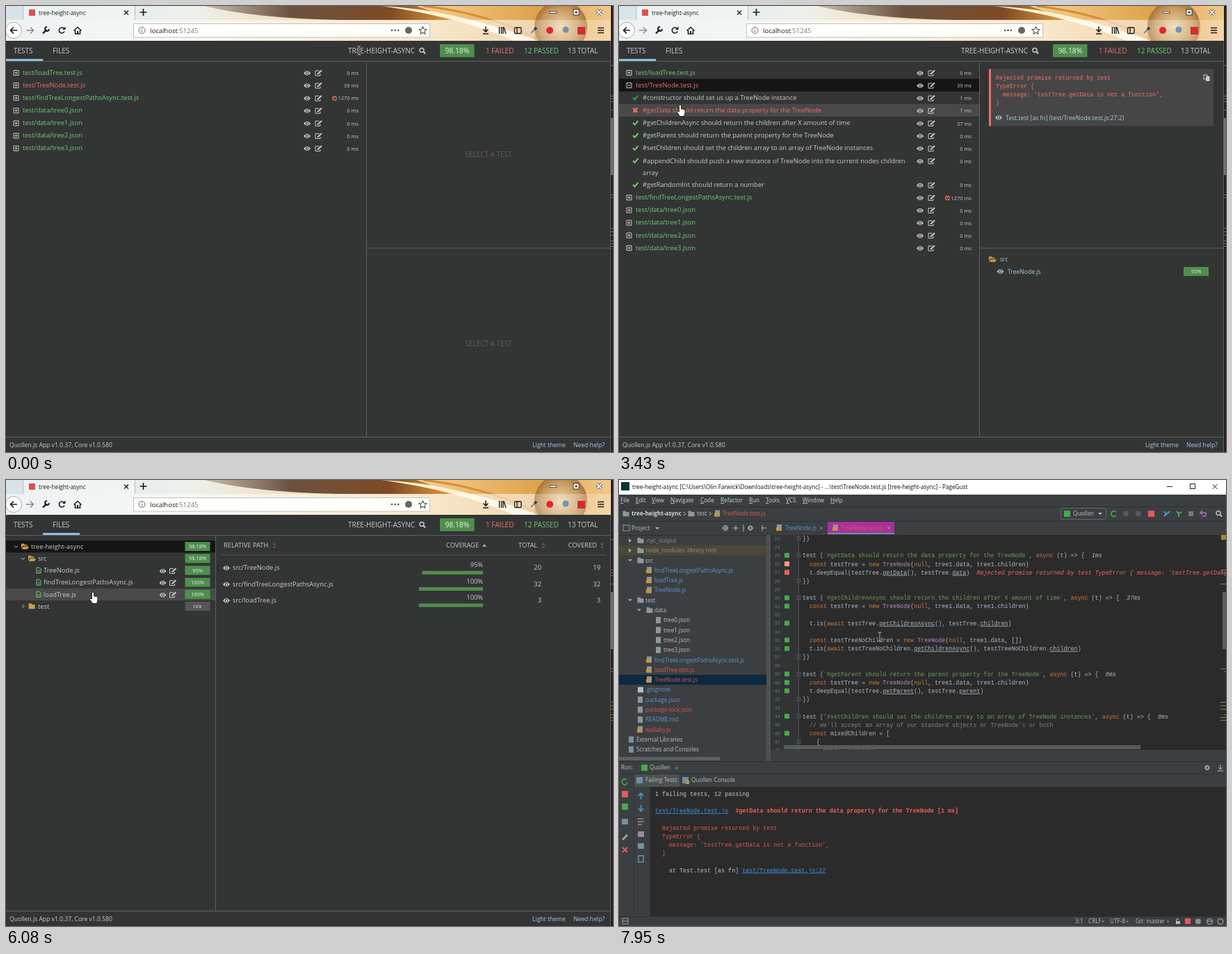
Animation, 873 px wide and 641 px high, one loop 8000 ms. Source, as an HTML page:

```html
<!DOCTYPE html>
<html lang="en">
<head>
<meta charset="utf-8">
<title>Test runner</title>
<style>
html, body { margin: 0; width: 100%; height: 100%; overflow: hidden; background: #333534; }
svg { display: block; width: 873px; height: 641px; font-family: "Open Sans", "Noto Sans", sans-serif; }
text { white-space: pre; }
.mono { font-family: "Liberation Mono", monospace; }
.u { text-decoration: underline; }
</style>
</head>
<body>
<svg id="stage" viewBox="0 0 873 641"></svg>
<script>
const BG = '#333534', LIGHT = '#c9cbca', GREEN = '#74c874', RED = '#ee7066', BLUE = '#a3cbe3',
      BADGE = '#4f8f4c', LINE = '#5a605e', FOLDER = '#c9a040';

// Drawing helpers; the y of a text is its visual centre
const rect = (x, y, w, h, fill, more = '') => `<rect x="${x}" y="${y}" width="${w}" height="${h}" fill="${fill}" ${more}/>`;
const circle = (x, y, r, fill, more = '') => `<circle cx="${x}" cy="${y}" r="${r}" fill="${fill}" ${more}/>`;
const line = (d, color, w = 1, fill = 'none') => `<path d="${d}" stroke="${color}" stroke-width="${w}" fill="${fill}"/>`;
const shape = (d, fill) => `<path d="${d}" fill="${fill}"/>`;
const text = (x, y, s, fill = LIGHT, size = 9.33, more = '') =>
  `<text x="${x}" y="${y + size * .36}" fill="${fill}" font-size="${size}" ${more}>${s}</text>`;
const END = 'text-anchor="end"', MID = 'text-anchor="middle"', MONO = 'class="mono"', BOLD = 'font-weight="bold"';
const mono = (x, y, s, fill, more = '') => text(x, y, s, fill, 8.35, MONO + ' ' + more);
const group = (id, body) => `<g id="${id}">${body}</g>`;
const at = (x, y, body) => `<g transform="translate(${x} ${y})">${body}</g>`;

// Icons
const eye = (x, y, c = LIGHT) => at(x, y, shape('M-5 0Q0-6.5 5 0Q0 6.5-5 0Z', c) + circle(0, 0, 2.3, BG) + circle(0, 0, 1.3, c));
const edit = (x, y) => at(x, y, line('M2.5 1V3.5H-4.5V-3.5H1', LIGHT) + line('M-1.5 1.5L4.5-4', LIGHT, 2));
const expander = (x, y, open) => line(`M${x - 3.5} ${y - 3.5}h7v7h-7zM${x - 2} ${y}h4` + (open ? '' : `M${x} ${y - 2}v4`), LIGHT);
const check = (x, y, o) => `<g opacity="${o}">${line(`M${x - 3.5} ${y}l2.7 2.7L${x + 4} ${y - 3}`, GREEN, 2)}</g>`;
const cross = (x, y, r, c, w = 1) => line(`M${x - r} ${y - r}l${2 * r} ${2 * r}m0 ${-2 * r}l${-2 * r} ${2 * r}`, c, w);
const folder = (x, y, c = FOLDER) => shape(`M${x - 4.5} ${y - 4}h4l1 1.4h4v6.4h-9z`, c);
const openFolder = (x, y, c = FOLDER) => shape(`M${x - 5} ${y - 4}h4l1 1.4h3.5v1.6h-6l-2.5 4z`, c) + shape(`M${x - 2} ${y}h8l-2 4h-8.5z`, c);
const doc = (x, y) => line(`M${x - 3} ${y - 4}h4l2 2v6h-6z`, GREEN) + line(`M${x - 1.5} ${y}h3m-3 2h3`, GREEN, .8);
const chevron = (x, y, down) => line(down ? `M${x - 2.5} ${y - 1}l2.5 2.5l2.5-2.5` : `M${x - 1} ${y - 2.5}l2.5 2.5l-2.5 2.5`, LIGHT);
const caret = (x, y, c, down = true, r = 3) => shape(`M${x - r} ${y}h${2 * r}l${-r} ${down ? r : -r}z`, c);
const badge = (x, y, s, c = BADGE) => rect(x, y - 6.5, 36, 13, c) + text(x + 18, y, s, '#e8ece8', 7.47, MID);
const search = (x, y, c) => circle(x - 1, y - 1, 3, 'none', `stroke="${c}" stroke-width="1.5"`) + line(`M${x + 1} ${y + 1}l3 3`, c, 2);
const gear = (x, y, c) => circle(x, y, 2.5, 'none', `stroke="${c}" stroke-width="2.4" stroke-dasharray="1.5 .6"`);

function edgeMarks() {
  const marks = [85, 129, 133, 137, 149, 271, 275, 319, 324, 329, 337, 341, 345];
  return rect(870, 161, 3, 82, '#77706f') + marks.map(y => rect(870, y, 3, 1, '#8a6a3c')).join('');
}

function browser() {
  const ink = '#1d1d1d';
  const stops = [[0, '#d5e4e8'], [.3, '#edf1ec'], [.48, '#f0dfbd'], [.7, '#f2cc8c'], [.88, '#dfa24b'], [1, '#efc98c']];
  const theme = `<defs><linearGradient id="sky">${stops.map(([o, c]) => `<stop offset="${o}" stop-color="${c}"/>`).join('')}</linearGradient>
    <linearGradient id="swoosh"><stop stop-color="#c9bfae"/><stop offset=".35" stop-color="#6b5140"/><stop offset=".75" stop-color="#7e4a26"/><stop offset="1" stop-color="#e09a3a"/></linearGradient>
    <radialGradient id="globe"><stop stop-color="#ead3ac"/><stop offset=".7" stop-color="#c99a5e"/><stop offset="1" stop-color="#a8743c"/></radialGradient></defs>`;
  const windowButtons = rect(782, 8, 10, 2.5, '#fff', 'stroke="#333" stroke-width=".8"') +
    rect(816, 5, 8, 8, '#fff', 'stroke="#333"') + rect(818.5, 7.5, 3, 3, '#444') + cross(853, 9, 3.5, '#444', 3.5) + cross(853, 9, 3.5, '#fff', 1.8);
  const toolbar = circle(11, 35, 11.5, '#fff', 'stroke="#aaa"') + line('M16 35H6.5M11 30.5L6.5 35L11 39.5', ink, 1.7) +
    line('M29 35h10M35 30.5l4.5 4.5l-4.5 4.5', '#8d8d8d', 1.5) +
    line('M53 39.5l5.5-5.5', ink, 2.4) + line('M62 33a3 3 0 1 1-3-3', ink, 1.8) +
    line('M83.5 32.5a4 4 0 1 0 .5 4', ink, 1.6) + shape('M85.5 29.5v4.5h-4.5z', ink) +
    line('M97.5 35.5l5.5-5l5.5 5M99.5 35v5h7v-5', ink, 1.6) + rect(102, 36, 2, 4, ink) +
    rect(183.5, 25.5, 426, 19.5, '#fffffb', 'stroke="#c5c1b8"') + circle(195.5, 35, 4.5, 'none', 'stroke="#666"') +
    line('M195.5 34.5v3M195.5 32v1.2', '#666') +
    text(207, 35.5, `localhost<tspan fill="#777">:51245</tspan>`, ink, 9.5) +
    [555, 559.5, 564].map(x => circle(x, 35, 1.3, '#555')).join('') + circle(579, 35, 5, '#666') +
    line('M599.5 29.8l1.6 3.5l3.8.4l-2.8 2.6l.8 3.8l-3.4-1.9l-3.4 1.9l.8-3.8l-2.8-2.6l3.8-.4z', '#555', 1.1) +
    line('M690 29.5v7M686.5 33.5l3.5 3.5l3.5-3.5M686 40h8', ink, 1.6) +
    line('M709.5 30v10M712.5 30v10M715 30v10M716 30.5l3 9.5', ink, 1.4) +
    rect(731.5, 31, 9.5, 8.5, 'none', 'stroke="#1d1d1d" stroke-width="1.3" rx="1"') + line('M735 31v9', ink, 1.3) +
    line('M755 39l5-5', '#5890b0', 2) + line('M760 34l3-3', '#36404a', 3.6) +
    circle(782, 35, 5, '#e5252d') + circle(805, 34, 4.5, '#7794a8') + rect(822, 30, 11, 11, '#d32d2f') +
    line('M851 31.5h9M851 35h9M851 38.5h9', ink, 1.7);
  return theme + rect(0, 0, 870, 50, 'url(#sky)') +
    shape('M285 0H590Q615 8 640 20H480Q360 18 285 0Z', 'url(#swoosh)') +
    shape('M540 0Q640 4 765 50H730Q650 15 540 0Z', '#fff2d2') + line('M600 0Q690 10 760 45', '#d78e33', 3) +
    `<clipPath id="bar">${rect(0, 0, 870, 50)}</clipPath><g clip-path="url(#bar)">${circle(798, 30, 38, 'url(#globe)')}</g>` +
    rect(0, 20, 760, 30, '#fff', 'opacity=".55"') + rect(760, 20, 110, 30, '#fff', 'opacity=".25"') +
    rect(25, 0, 160, 20, '#f4f7f6', 'opacity=".75"') + line('M25 0V20M185.5 0V20', '#b7c1c3') +
    rect(33, 5, 9, 9, '#e04f4f') + text(47, 9.5, 'tree-height-async', ink, 8.4) + cross(173, 9.5, 3, ink, 1.4) +
    line('M192.5 9h10M197.5 4v10', ink, 1.7) + windowButtons + toolbar;
}

function appFrame() {
  return rect(0, 50, 870, 591, BG) + rect(870, 0, 3, 641, '#2d1c1d') + edgeMarks() +
    line('M0 79.5H870M0 619.5H870', LINE) + line('M869.5 50V641', '#4d6470') +
    text(11, 64.5, 'TESTS', LIGHT, 10) + text(67, 64.5, 'FILES', LIGHT, 10) +
    text(492, 64.5, 'TREE-HEIGHT-ASYNC', LIGHT, 10) + search(599, 64.5, LIGHT) +
    rect(624, 55, 49.5, 18.5, BADGE) + text(648.8, 64.5, '98.18%', '#eee', 10.3, MID) +
    text(690, 64.5, '1 FAILED', RED, 10) + text(745, 64.5, '12 PASSED', GREEN, 10) + text(808, 64.5, '13 TOTAL', LIGHT, 10) +
    text(5, 630.5, 'Quollen.js App v1.0.37, Core v1.0.580', LIGHT, 8.6) +
    text(757, 630.5, 'Light theme', BLUE, 8.6) + text(816, 630.5, 'Need help?', BLUE, 8.6);
}

// Test list
const suites = [['loadTree.test.js', 0], ['TreeNode.test.js', 39], ['findTreeLongestPathsAsync.test.js', 1270],
  ...[0, 1, 2, 3].map(n => [`data/tree${n}.json`, 0])].map(([name, ms]) => ({ suite: true, name: 'test/' + name, ms }));
const cases = [
  ['#constructor should set us up a TreeNode instance', 1],
  ['#getData should return the data property for the TreeNode', 1],
  ['#getChildrenAsync should return the children after X amount of time', 37],
  ['#getParent should return the parent property for the TreeNode', 0],
  ['#setChildren should set the children array to an array of TreeNode instances', 0],
  ['#appendChild should push a new instance of TreeNode into the current nodes children', 0, 'array'],
  ['#getRandomInt should return a number', 0]
].map(([name, ms, rest]) => ({ name, ms, rest }));

function layout(items) {
  let y = 95.5;
  return items.map(item => {
    const height = item.rest ? 34.6 : 18.1, row = { ...item, y, top: y - 9, height };
    y += height;
    return row;
  });
}
const closedRows = layout(suites);
const openRows = layout([...suites.slice(0, 2), ...cases, ...suites.slice(2)]);
const fileRows = [0, 1, 2, 3, 4, 5].map(i => ({ y: 95.5 + 17.2 * i, top: 87 + 17.2 * i, height: 17.2 }));

function testRow({ suite, name, ms, rest, y }, open) {
  const failed = /TreeNode\.test|#getData/.test(name);
  let s = suite
    ? expander(14.5, y + .5, open && failed) + text(24, y, name, failed ? RED : GREEN)
    : (failed ? cross(23.5, y, 3, RED, 2.4) : check(23.5, y, name.startsWith('#con') ? .6 : 1)) + text(34, y, name, failed ? RED : LIGHT);
  if (rest) s += text(34, y + 17.3, rest);
  if (ms > 1000) s += circle(472.5, y + 1, 2.8, 'none', `stroke="${RED}" stroke-width="1.2"`) + line(`M472.5 ${y - .7}v2h-1.5`, RED, .8);
  return s + eye(433, y + 1) + edit(449.5, y + 1) + text(507, y + 1, ms + ' ms', LIGHT, 7.47, END);
}

const panes = rect(0, 76, 53, 3, '#8fbfdf') + line('M518.5 80V619M518.5 348H869', LINE);
const prompt = y => text(694, y, 'SELECT A TEST', '#5b5e5d', 10, MID);

function failurePanel() {
  const lines = ['Rejected promise returned by test', 'TypeError {', "  message: 'testTree.getData is not a function',", '}'];
  return rect(532, 90.5, 323, 82, '#454645') + rect(532, 90.5, 3, 82, RED) +
    lines.map((s, i) => mono(542, 102.5 + 12.3 * i, s, RED)).join('') +
    rect(841, 99, 5, 6, 'none', `stroke="${LIGHT}"`) + rect(844, 101, 5.5, 7, LIGHT) +
    eye(546, 160.5, BLUE) + text(556, 160.5, 'Test.test [as fn] (test/TreeNode.test.js:27:2)', BLUE, 8.6) +
    openFolder(537, 364, '#c98d45') + text(548, 364, 'src', BLUE, 8.6) +
    eye(548.5, 381.5, BLUE) + text(559, 381.5, 'TreeNode.js', BLUE, 8.6) + badge(812, 381.5, '95%');
}

function filesView() {
  const tree = [['tree-height-async', '98.18%'], ['src', '98.18%'], ['TreeNode.js', '95%'],
    ['findTreeLongestPathsAsync.js', '100%'], ['loadTree.js', '100%'], ['test', 'n/a']];
  const drawTree = tree.map(([name, cover], i) => {
    const y = fileRows[i].y, isFile = name.endsWith('.js'), x = i ? isFile ? 54 : 46 : 36;
    return text(x, y, name) + badge(257.5, y, cover, i == 5 ? '#555756' : BADGE) +
      (isFile ? doc(47, y) + eye(225.5, y + 1) + edit(240, y + 1)
              : chevron(x - 21.5, y, i < 5) + (i < 5 ? openFolder : folder)(x - 9, y));
  }).join('');
  const sorter = x => caret(x, 93, '#666', false, 2.5) + caret(x, 95.5, '#666', true, 2.5);
  const table = [['TreeNode', 95, 20, 19], ['findTreeLongestPathsAsync', 100, 32, 32], ['loadTree', 100, 3, 3]].map(([name, cover, total, covered], i) => {
    const y = 126 + 23.4 * i, w = cover * .92;
    return eye(317, y + .5) + text(326, y, `src/${name}.js`) + text(686, y - 4, cover + '%', LIGHT, 9.33, END) +
      rect(686 - w, y + 4.7, w, 5, BADGE) + text(770, y, total, LIGHT, 9.33, END) + text(855, y, covered, LIGHT, 9.33, END);
  }).join('');
  return rect(53, 76, 53, 3, '#8fbfdf') + line('M301.5 80V619', LINE) + line('M309 107.5H863', '#4b504e') +
    rect(0, 87, 301, 17.2, '#151515') + drawTree +
    text(313, 94, 'RELATIVE PATH') + sorter(386) + text(633, 94, 'COVERAGE') + caret(688, 95.5, LIGHT, false) +
    text(737, 94, 'TOTAL') + sorter(773) + text(808.5, 94, 'COVERED') + sorter(857.5) + table;
}

// Code editor window
const UI = 8.2, PANEL = '#3c3f41', EDITOR = '#2b2b2b', DIM = '#bbbdbe', LINK = '#5c95cc', ERR = '#d4584e', OK = '#47a84a';
const ui = (x, y, s, c = DIM, more) => text(x, y, s, c, UI, more);
const script = (x, y) => rect(x - 4, y - 5, 7, 9, '#8b98a0') + rect(x - 5, y - 1, 7, 5, '#c9913c');

const highlight = s => s.replace(
  /(\/\/.*)|([`'].*[`'])|\b(const|new|await|null|async)\b|\b(TreeNode)\b|(testTree(?:NoChildren)?\.)(\w+)/g,
  (all, comment, string, keyword, type, owner, member) => {
    if (owner) return `${owner}<tspan class="u">${member}</tspan>`;
    return `<tspan fill="${comment ? '#808080' : string ? '#6a9a59' : keyword ? '#cc7832' : '#b389c5'}">${all}</tspan>`;
  });

function codeEditor() {
  const make = '  const testTree = new TreeNode(null, tree1.data, tree1.children)';
  const head = (title, q = '`') => `test (${q}${title}${q}, async (t) => {`;
  const title = i => cases[i].name;
  const code = ['})', '', head(title(1)), make, '  t.deepEqual(testTree.getData(), testTree.data)', '})', '',
    head(title(2)), make, '', '  t.is(await testTree.getChildrenAsync(), testTree.children)', '',
    '  const testTreeNoChildren = new TreeNode(null, tree1.data, [])',
    '  t.is(await testTreeNoChildren.getChildrenAsync(), testTreeNoChildren.children)', '})', '',
    head(title(3)), make, '  t.deepEqual(testTree.getParent(), testTree.parent)', '})', '',
    head(title(4), "'"), "  // We'll accept an array of our standard objects or TreeNode's or both",
    '  const mixedChildren = [', '    {', "      data: 'rootTest'"];
  const notes = { 25: '1ms', 30: '37ms', 39: '0ms', 44: '0ms',
    27: "Rejected promise returned by test TypeError { message: 'testTree.getData is not a function' }" };
  const tested = [25, 26, 27, 30, 31, 33, 35, 36, 39, 40, 41, 44, 46];
  const body = code.map((s, i) => {
    const n = i + 23, y = 84 + 12.17 * i, note = notes[n];
    const mark = n == 26 ? '#f0a070' : n == 27 ? '#f0605a' : OK;
    return text(232, y, n, '#6b6e70', 7.4, MONO + END) + mono(264, y, highlight(s), '#a9b7c6') +
      (tested.includes(n) ? rect(238, y - 3.5, 7, 7, mark, 'rx="1"') : '') +
      (/^(test|}\)|    {)/.test(s) ? rect(256, y - 2.5, 5, 5, EDITOR, 'stroke="#606366" stroke-width=".8"') + line(`M257 ${y}h3`, '#777', .7) : '') +
      (note ? mono(264 + (s.length + 2) * 5.01, y, note, n == 27 ? '#f0605a' : '#a9b7c6', 'font-style="italic"') : '');
  }).join('');
  return rect(218, 79, 655, 309, EDITOR) + rect(218, 79, 40, 309, '#313335') + line('M258.5 79V388', '#505254') +
    `<clipPath id="code">${rect(218, 79, 655, 309)}</clipPath><g clip-path="url(#code)">${body}</g>` +
    rect(237, 381, 513, 6, '#606263', 'opacity=".85"') + rect(866, 79, 7, 7, '#9a8a3c') + edgeMarks() + rect(868, 161, 5, 82, '#5c5e5f') +
    [129, 133, 149, 271, 319, 324, 329, 341, 345].map(y => rect(865, y, 8, 1, '#8a8050')).join('');
}

function projectTree() {
  // indent, label, colour; a leading ">" or "v" marks a folder
  const nodes = [[0, '>.nyc_output', '#888'], [0, '>node_modules', '#9a8f72'], [0, 'vsrc'],
    ...['findTreeLongestPathsAsync.js', 'loadTree.js', 'TreeNode.js'].map(s => [1, s, LINK]), [0, 'vtest'], [1, 'vdata'],
    ...[0, 1, 2, 3].map(n => [2, `tree${n}.json`, DIM]), [1, 'findTreeLongestPathsAsync.test.js', LINK],
    [1, 'loadTree.test.js', ERR], [1, 'TreeNode.test.js', ERR], [0, '.gitignore', LINK], [0, 'package.json', LINK],
    [0, 'package-lock.json', ERR], [0, 'README.md', LINK], [0, 'wallaby.js', ERR], [-1, 'External Libraries'], [-1, 'Scratches and Consoles']];
  return rect(0, 94, 212, 14.3, '#4b4739') + rect(0, 280, 212, 14.3, '#0d293e') + nodes.map(([depth, label, color = DIM], i) => {
    const y = 87 + 14.3 * i, x = 38 + 13 * depth, kind = /^[>v](?!.*\.js)/.test(label) && label[0];
    let icon;
    if (kind) icon = folder(x - 7, y, '#8b98a0') + (kind == 'v' ? caret(x - 22, y - 1.5, '#aaa') : shape(`M${x - 24} ${y - 3}l4 3l-4 3z`, '#aaa'));
    else if (label == '.gitignore') icon = rect(x - 11, y - 4, 8, 8, '#b9bdbf');
    else if (/\.js$/.test(label)) icon = script(x - 7, y);
    else icon = rect(x - 11, y - 4.5, 7, 9, depth < 0 ? '#78909c' : '#8b98a0');
    return icon + ui(x, y, kind ? label.slice(1) : label, color);
  }).join('') + ui(98, 101.3, 'library root', '#9a8f72') + rect(212, 79, 6, 325, '#4e5153') + rect(0, 398, 145, 5, '#5d6062');
}

function ide() {
  const menus = [['File', 2], ['Edit', 24], ['View', 47], ['Navigate', 74], ['Code', 117], ['Refactor', 146], ['Run', 187],
    ['Tools', 211], ['VCS', 240], ['Window', 264], ['Help', 304]];
  const title = 'tree-height-async [C:\\Users\\Olin Farwick\\Downloads\\tree-height-async] - ...\\test\\TreeNode.test.js [tree-height-async] - PageGust';
  const top = rect(0, 0, 873, 641, PANEL) + rect(0, 0, 873, 21, '#fff') + rect(3, 3, 12, 12, '#10303c') + ui(19, 10, title, '#111') +
    line('M788 9.5h8', '#222') + rect(821.5, 5.5, 7, 7, 'none', 'stroke="#222"') + cross(857, 9.5, 3.5, '#222') +
    menus.map(([s, x]) => ui(x, 29, `<tspan class="u">${s[0]}</tspan>${s.slice(1)}`, '#d0d2d3')).join('') +
    line('M0 38.5H873M0 59.5H873M0 79.5H873M0 404.5H873M0 422.5H873M0 627.5H873', '#2f3234') +
    folder(10, 48.5, '#8b98a0') + ui(18, 48.5, 'tree-height-async', '#d4d6d7', BOLD) + chevron(94, 48.5) +
    folder(104, 48.5, '#8b98a0') + ui(112, 48.5, 'test') + chevron(131, 48.5) + script(142, 48.5) + ui(149, 48.5, 'TreeNode.test.js', ERR) +
    rect(635.5, 40.5, 65, 16, PANEL, 'stroke="#65686a" rx="2"') + rect(640, 44, 9, 9, OK) + ui(653, 48.5, 'Quollen') + caret(692, 47, DIM) +
    line('M715 46a4 4 0 1 0 0 5', OK, 1.6) + circle(729, 48.5, 4, '#55595b') + circle(747, 48.5, 4, '#55595b') + rect(761, 44, 9, 9, '#e25c5c') +
    line('M784 52l8-7m-8 0l3 4', '#4f9fd8', 1.8) + line('M802 45l3 3l4-2m-4 2v5', '#55b05a', 1.8) +
    rect(819, 45, 7, 7, '#777') + line('M837 47h6a3 3 0 0 1 0 5h-4M839 44l-3 3l3 3', '#a87ab8', 1.5) + search(863, 48.5, DIM);
  const project = rect(6, 65, 9, 8, 'none', 'stroke="#8b98a0"') + ui(18, 69, 'Project') + caret(55, 68, DIM) +
    circle(153, 69, 3.5, 'none', `stroke="${DIM}"`) + line('M153 65v8M149 69h8M164 69h8M168 65v8M179 64v10M206 65v8M206 69h6', DIM) +
    gear(189, 69, DIM) + projectTree();
  const tabs = script(231, 69) + ui(239, 69, 'TreeNode.js', LINK) + cross(291, 69, 2, '#888') +
    rect(300, 60, 96, 17, '#a8309a') + rect(300, 76, 96, 2, '#6d8fa8') + script(312, 69) + ui(319, 69, 'TreeNode.test.js', '#e0584e') + cross(388, 69, 2, '#999');
  const output = ['Rejected promise returned by test', 'TypeError {', "  message: 'testTree.getData is not a function',", '}'];
  const run = ui(3, 413.5, 'Run:') + rect(32, 409, 9, 9, OK) + ui(44, 413.5, 'Quollen') + cross(83, 414, 2, '#888') +
    gear(846, 413.5, DIM) + line('M865 409v6m-3-2l3 3l3-3M861 418h8', DIM) +
    rect(21, 423, 66, 18, '#4c5154') + rect(25, 427, 9, 9, '#6d8fa8') + ui(38, 431.5, 'Failing Tests') +
    rect(91, 427, 9, 9, '#6d8fa8') + rect(96, 432, 5, 5, '#c9913c') + ui(104, 431.5, 'Quollen Console') +
    line('M21.5 423V627M44.5 441V627', '#323537') +
    line('M11 431a4 4 0 1 0 1 4', OK, 1.6) + rect(4, 447, 9, 9, '#e25c5c') + rect(4, 465, 9, 9, OK) +
    rect(4, 487, 9, 8, '#77909f') + line('M5 517l7-7', '#9aa0a3', 3) + cross(8.5, 531.5, 3.5, '#e25c5c', 1.8) +
    line('M31.5 459v-9m-3.5 4l3.5-4l3.5 4M31.5 467v9m-3.5-4l3.5 4l3.5-4', '#4f92c4', 1.7) +
    line('M27 487h8M27 491h9M27 495h6', DIM) + rect(27, 505, 9, 8, '#9a87a5') + rect(27, 522, 9, 8, '#77909f') +
    rect(28, 540, 7, 9, 'none', 'stroke="#77909f" stroke-width="1.5"') +
    rect(45, 441, 828, 186, EDITOR) + mono(52, 451, '1 failing tests, 12 passing', '#c5c8c9') +
    mono(52, 475, '<tspan class="u">test/TreeNode.test.js</tspan>', '#3d8fe0') + mono(167.5, 475, title1 + ' [1 ms]', '#ee5f57', BOLD) +
    output.map((s, i) => mono(62, 499.5 + 12.2 * i, s, '#d9564e')).join('') +
    mono(72, 560.5, 'at Test.test [as fn] <tspan class="u" fill="#3d8fe0">test/TreeNode.test.js:27</tspan>', '#bbb');
  const status = rect(5, 630, 8, 8, 'none', 'stroke="#9aa0a3"') + line('M5 634h8', '#9aa0a3') +
    [['3:1', 656], ['CRLF÷', 675], ['UTF-8÷', 706], ['Git: master ÷', 743]].map(([s, x]) => ui(x, 634.5, s)).join('') +
    rect(801, 634, 6, 4, DIM) + line('M802 634v-3h3', DIM) + rect(814, 630, 8, 8, '#e25c5c') + circle(833, 634.5, 4, '#8b9092') +
    circle(849.5, 634.5, 4, 'none', `stroke="${DIM}"`) + line('M846 634h7', DIM) + circle(865, 634.5, 4, 'none', `stroke="${DIM}"`);
  return top + project + tabs + codeEditor() + run + status;
}
const title1 = cases[1].name;

const stage = document.getElementById('stage');
stage.innerHTML = browser() + appFrame() + rect(0, 0, 0, 0, '#484948', 'id="hover"') +
  group('closed', panes + prompt(213.5) + prompt(485.5) + closedRows.map(r => testRow(r)).join('')) +
  group('open', panes + rect(0, 104.6, 518, 18.3, '#151515') + openRows.map(r => testRow(r, true)).join('') + failurePanel()) +
  group('files', filesView()) +
  group('tip', rect(-1, 626, 102.5, 16, '#fafafa', 'stroke="#aaa"') + text(98, 633.5, 'wallabyjs.com/app/#/files', '#222', 8.2, END)) +
  group('ide', ide()) +
  group('cursor',
    group('hand', line('M-1.6 1Q0-1 1.6 1V6Q6.5 5.8 7 8.5V12L5.5 16.5H-.5L-4.5 10.5Q-4-8.2-1.6 10Z'.replace('-4-8.2', '-4 8'), '#111', .9, '#fff')) +
    group('arrow', line('M0 0V13L3 10.2L5 15L7 14L5 9.5H9Z', '#111', .9, '#fff')) +
    group('beam', line('M-2.5-6H2.5M0-6V6M-2.5 6H2.5', '#111', 2.2) + line('M-2.5-6H2.5M0-6V6M-2.5 6H2.5', '#ddd', .9)));
const el = Object.fromEntries([...stage.querySelectorAll('[id]')].map(e => [e.id, e]));
const show = (id, on) => { el[id].style.display = on ? '' : 'none'; };

// start, end, steps, first position, last position
const moves = [
  [0, 0, 1, 508, 64, 508, 64],
  [120, 900, 8, 480, 58, 80, 57],
  [1450, 2230, 8, 78, 65, 15, 114],
  [3430, 4210, 8, 88, 142, 88, 59],
  [4740, 5540, 8, 88, 59, 121, 124],
  [5640, 6080, 5, 122, 128, 125, 161],
  [6190, 6420, 3, 125, 167, 122, 177],
  [6520, 6860, 4, 121, 178, 114, 181],
  [7190, 7410, 3, 114, 172, 112, 139],
  [7520, 7850, 4, 130, 150, 330, 215],
  [7950, 7950, 1, 375, 225, 375, 225]
];
function pointer(t) {
  const [start, end, steps, x0, y0, x1, y1] = moves.findLast(m => t >= m[0]);
  const gaps = steps - 1, k = gaps ? Math.min(1, Math.floor((t - start) / (end - start) * gaps + 1e-6) / gaps) : 1;
  return [x0 + (x1 - x0) * k, y0 + (y1 - y0) * k];
}

function render(t) {
  const [x, y] = pointer(t), inIde = t >= 7950;
  const view = t < 2330 ? 'closed' : t < 4740 ? 'open' : 'files';
  const rows = { closed: closedRows, open: openRows, files: fileRows }[view], width = view == 'files' ? 301 : 518;
  const row = x < width && rows.find(r => y >= r.top && y < r.top + r.height);
  for (const id of ['closed', 'open', 'files']) show(id, id == view);
  show('hover', row);
  if (row) for (const [k, v] of Object.entries({ y: row.top, width, height: row.height })) el.hover.setAttribute(k, v);
  show('tip', (t >= 790 && t < 1450) || (t >= 4100 && t < 4850));
  el.tip.style.opacity = t < 1020 ? .6 : 1;
  show('ide', inIde);
  const kind = inIde || t < 120 ? 'beam' : row || (y < 79 && x < 95) ? 'hand' : 'arrow';
  for (const id of ['hand', 'arrow', 'beam']) show(id, id == kind);
  el.cursor.setAttribute('transform', `translate(${x} ${y})`);
}

const began = performance.now();
function tick() {
  render((performance.now() - began) % 8000);
  requestAnimationFrame(tick);
}
tick();
</script>
</body>
</html>
```
